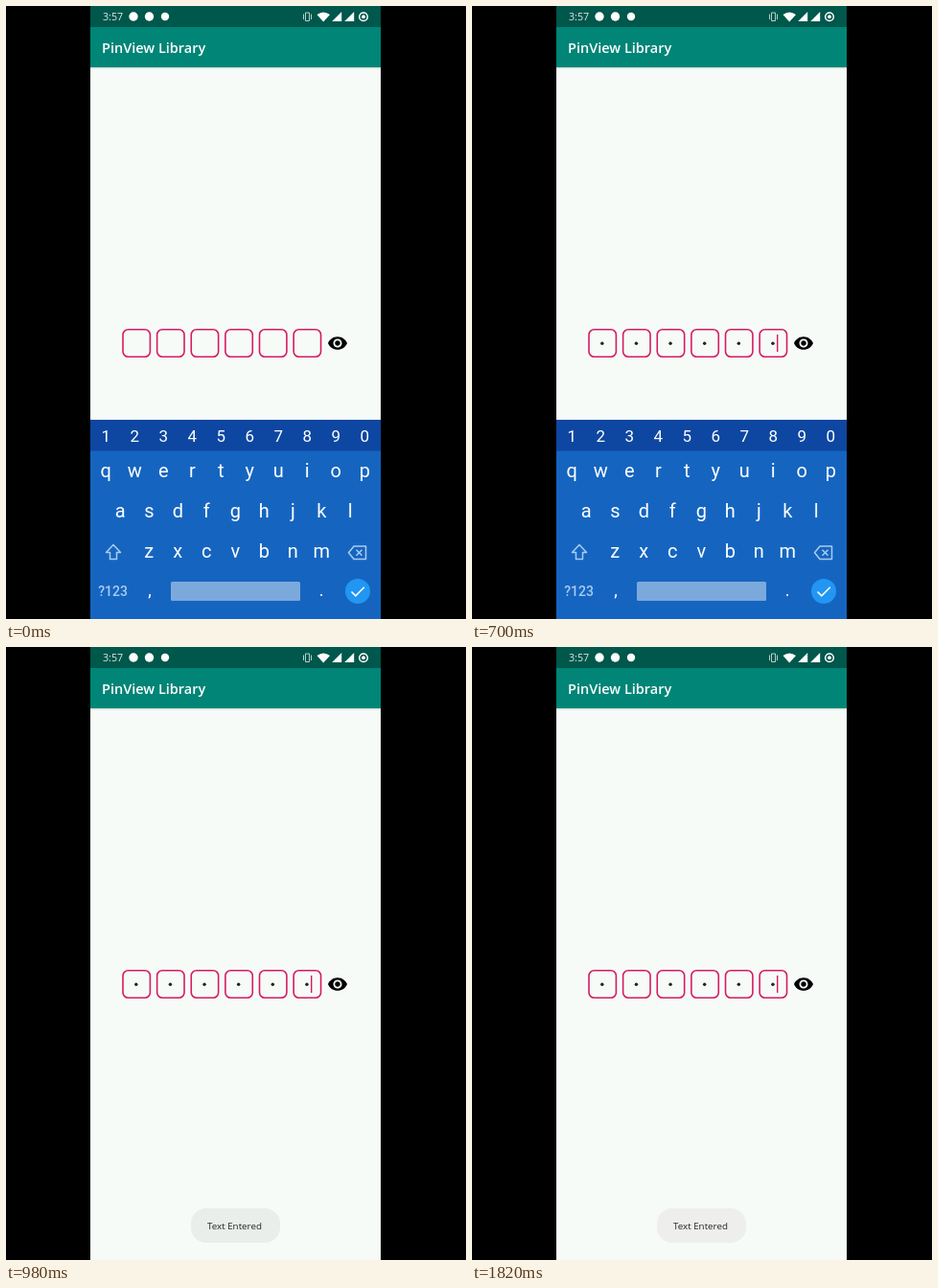
Recreate the animation shown at these times as an HTML page. Size 480 by 640 pixels, loop 1960 ms.

```html
<!DOCTYPE html>
<html lang="en">
<head>
<meta charset="utf-8">
<title>PinView Library</title>
<style>
  html, body { margin: 0; width: 100%; height: 100%; overflow: hidden; background: #000; }
  svg { display: block; }
  text { font-family: "Open Sans", "Noto Sans", sans-serif; }
  .key { font-family: Roboto, sans-serif; fill: #fff; text-anchor: middle; }
  .line { fill: none; stroke: #a9cbef; stroke-width: 1.5; stroke-linejoin: round; }
</style>
</head>
<body>
<svg width="480" height="640" viewBox="0 0 480 640">
  <defs><clipPath id="phone"><rect x="88" width="303" height="640"/></clipPath></defs>
  <rect width="480" height="640" fill="#000"/>
  <g clip-path="url(#phone)">
    <rect x="88" width="303" height="640" fill="#f6fbf8"/>
    <rect x="88" y="64" width="303" height="1.5" fill="#d5dfdb"/>
    <rect x="88" y="22" width="303" height="42" fill="#008577"/>
    <rect x="88" width="303" height="22" fill="#00574b"/>
    <text x="100" y="49" font-size="14.5" font-weight="600" fill="#fff">PinView Library</text>

    <g fill="#fff">
      <text x="101" y="15" font-size="10.7" fill="#dcebe8">3:57</text>
      <circle cx="133" cy="11" r="4.7"/>
      <circle cx="149.500" cy="11" r="4.700"/>
      <circle cx="166" cy="11" r="4.2"/>
      <path d="M312.500 7h4v8.500h-4zM310.500 8.500v5.500M318.500 8.500v5.500" fill="none" stroke="#b5d0cb"/>
      <path d="M324.500 9Q331.200 3.800 338 9L331.200 16.500z"/>
      <path d="M350.200 6v10h-10zM363.200 6v10h-10z"/>
      <circle cx="373" cy="11.200" r="4.300" fill="none" stroke="#fff" stroke-width="1.500"/>
      <circle cx="373" cy="11.200" r="1.900"/>
    </g>

    <g id="cells"></g>
    <path id="eye" transform="translate(335.100 341.100) scale(.908)"/>
    <rect id="caret" y="343" height="18"/>

    <g id="board">
      <rect x="88" y="432" width="303" height="220" fill="#1565c0"/>
      <rect x="88" y="432" width="303" height="32.500" fill="#0d47a1"/>
      <g id="keys"></g>
      <path class="line" d="M112 562.500l7.500 8h-4v7h-7v-7h-4z"/>
      <path class="line" d="M363 564h12.500v13.500H363l-5.500-6.700zM365.500 567.800l6 6M371.500 567.800l-6 6"/>
      <text class="key" x="111.500" y="616" font-size="14" font-weight="500" style="fill:#a9cbef">?123</text>
      <rect x="172" y="601" width="135" height="20" rx="1.500" fill="#7ba9dc"/>
      <circle cx="367" cy="611" r="13" fill="#2196f3"/>
      <path d="M360.500 611.500l4.300 4.300 9-9" fill="none" stroke="#fff" stroke-width="1.600"/>
      <g id="popup">
        <rect x="-15.500" y="-66" width="31.500" height="90" rx="3.500" fill="#0b3b87" opacity=".35"/>
        <rect x="-15.500" y="-68" width="31" height="89" rx="3" fill="#0d47a1"/>
        <text id="pressed" class="key" y="-39" font-size="21.500"/>
        <path d="M5.500-31h1.300M8-31h1.300M10.500-31h1.300" stroke="#b5cdf0" stroke-width="1.200"/>
      </g>
    </g>

    <g id="toast">
      <rect id="pill" x="193" y="586" width="93" height="36" rx="16"/>
      <text x="210" y="608" font-size="9.800" fill="#222">Text Entered</text>
    </g>
  </g>
</svg>
<script>
const LOOP = 1960;
const CODE = 'DGGCCF';
const EYE = 'M12 4.5C7 4.5 2.73 7.61 1 12c1.73 4.39 6 7.5 11 7.5s9.27-3.11 11-7.5c-1.73-4.39-6-7.5-11-7.5zM12 17c-2.76 0-5-2.24-5-5s2.24-5 5-5 5 2.24 5 5-2.24 5-5 5zm0-8c-1.66 0-3 1.34-3 3s1.34 3 3 3 3-1.34 3-3-1.34-3-3-3z';
const EYE_OFF = 'M12 7c2.76 0 5 2.24 5 5 0 .65-.13 1.26-.36 1.83l2.92 2.92c1.51-1.26 2.7-2.89 3.43-4.75-1.73-4.39-6-7.5-11-7.5-1.4 0-2.74.25-3.98.7l2.16 2.16C10.74 7.13 11.35 7 12 7zM2 4.27l2.28 2.28.46.46C3.08 8.3 1.78 10.02 1 12c1.73 4.39 6 7.5 11 7.5 1.55 0 3.03-.3 4.38-.84l.42.42L19.73 22 21 20.73 3.27 3 2 4.27zM7.53 9.8l1.55 1.55c-.05.21-.08.43-.08.65 0 1.66 1.34 3 3 3 .22 0 .44-.03.65-.08l1.55 1.55c-.67.33-1.41.53-2.2.53-2.76 0-5-2.24-5-5 0-.79.2-1.53.53-2.2zm4.31-.78l3.15 3.15.02-.16c0-1.66-1.34-3-3-3l-.17.01z';

// Each step starts at `at` and overrides the values before it.
const STEPS = [
  { at: 0, count: 0, key: '', board: 1, shift: 0, toast: 0, shown: false, pill: '#e9eeea' },
  { at: 210, key: 'd' },
  { at: 280, key: 'g', count: 1 },
  { at: 350, count: 2 },
  { at: 420, key: '', count: 3 },
  { at: 490, key: 'c' },
  { at: 560, count: 4 },
  { at: 630, key: 'f', count: 5 },
  { at: 700, key: '', count: 6 },
  { at: 770, board: .925, shift: 4, toast: .34 },
  { at: 840, board: 0, toast: .68 },
  { at: 910, toast: .9 },
  { at: 980, toast: 1 },
  { at: 1190, shown: true },
  { at: 1470, shown: false, pill: '#eeefed' },
  { at: 1610, shown: true },
  { at: 1820, shown: false },
];

const $ = id => document.getElementById(id);
const cellX = i => 136.2 + 35.63 * i;

function add(parent, tag, attrs, text = '') {
  const el = document.createElementNS('http://www.w3.org/2000/svg', tag);
  for (const name in attrs) el.setAttribute(name, attrs[name]);
  el.textContent = text;
  parent.append(el);
  return el;
}

const cells = [...CODE].map((letter, i) => {
  const x = cellX(i), g = $('cells');
  add(g, 'rect', { x: x - 14.2, y: 337.8, width: 28.4, height: 28.4, rx: 5.5,
    fill: 'none', stroke: '#d81b60', 'stroke-width': 1.6 });
  return {
    dot: add(g, 'circle', { cx: x - .4, cy: 352.2, r: 1.7, fill: '#222' }),
    letter: add(g, 'text', { x: x - .2, y: 357, 'font-size': 13, 'text-anchor': 'middle', fill: '#333' }, letter),
  };
});

const keyAt = {};
function keyRow(chars, x, y, size) {
  [...chars].forEach((char, i) => {
    keyAt[char] = [x + 30 * i, y];
    add($('keys'), 'text', { class: 'key', x: x + 30 * i, y, 'font-size': size }, char);
  });
}
keyRow('1234567890', 104.3, 455, 17);
keyRow('qwertyuiop', 104.3, 492, 20);
keyRow('asdfghjkl', 119.3, 534, 20);
keyRow('zxcvbnm', 149.3, 576, 20);
keyRow(',', 150, 616, 18);
keyRow('.', 329, 616, 18);

const show = (el, on) => el.setAttribute('visibility', on ? 'visible' : 'hidden');

function draw(time) {
  const s = Object.assign({}, ...STEPS.filter(step => step.at <= time));
  cells.forEach((cell, i) => {
    show(cell.dot, i < s.count && !s.shown);
    show(cell.letter, i < s.count && s.shown);
  });
  $('eye').setAttribute('d', s.shown ? EYE_OFF : EYE);

  const full = s.count === CODE.length;
  const caret = $('caret');
  show(caret, time >= 210);
  caret.setAttribute('x', full ? 318 : cellX(s.count) - .2);
  caret.setAttribute('width', full ? 1.4 : 1);
  caret.setAttribute('fill', full ? '#d81b60' : '#b5667f');

  $('board').setAttribute('opacity', s.board);
  $('board').setAttribute('transform', `translate(0 ${s.shift})`);
  // The popup group inherits its visibility down to its parts.
  show($('popup'), s.key);
  if (s.key) {
    $('popup').setAttribute('transform', `translate(${keyAt[s.key]}) translate(.2 -7)`);
    $('pressed').textContent = s.key;
  }
  $('toast').setAttribute('opacity', s.toast);
  $('pill').setAttribute('fill', s.pill);
}

const start = performance.now();
function tick(now) {
  draw(Math.max(0, now - start) % LOOP);
  requestAnimationFrame(tick);
}
draw(0);
requestAnimationFrame(tick);
</script>
</body>
</html>
```
